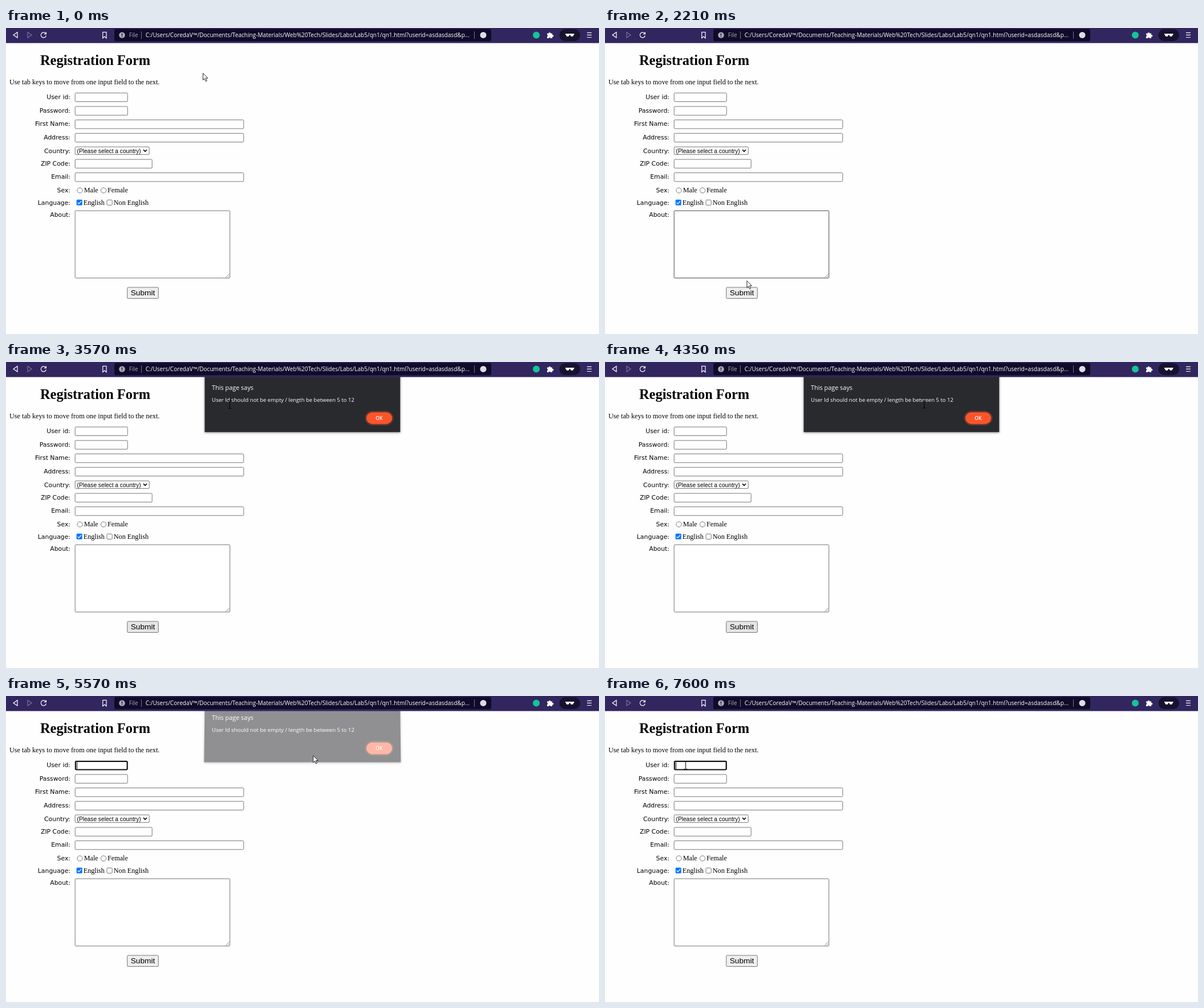
An HTML page that plays this animation: 1040 by 538 pixels, repeating every 8 s.

```html
<!DOCTYPE html>
<html lang="en">
<head>
<meta charset="utf-8">
<title>Registration Form</title>
<style>
  html, body { margin: 0; width: 100%; height: 100%; overflow: hidden; background: #fefefe; }
  svg { display: block; width: 1040px; height: 538px; }
  text { white-space: pre; }
  .serif { font: 12.2px "Liberation Serif", serif; }
  .serif .title { font-size: 24.4px; font-weight: bold; }
  .label { font: 10.85px "DejaVu Sans", sans-serif; text-anchor: end; }
  .sans { font: 10.2px "Liberation Sans", sans-serif; }
  .ui { font: 10.08px "Open Sans", sans-serif; fill: #fff; }
  .box { fill: #fff; stroke: #767676; }
  .line { fill: none; stroke: #fff; stroke-width: 1.2; }
  #dialog { filter: drop-shadow(0 1.5px 2px rgba(0, 0, 0, .45)); }
</style>
</head>
<body>
<svg viewBox="0 0 1040 538">
  <rect width="1040" height="538" fill="#fefefe"/>

  <g class="serif">
    <text class="title" x="60" y="65">Registration Form</text>
    <text x="6" y="98.7">Use tab keys to move from one input field to the next.</text>
    <text x="136.7" y="289">Male</text>
    <text x="178" y="289">Female</text>
    <text x="135.7" y="310.7">English</text>
    <text x="188.8" y="310.7">Non English</text>
  </g>
  <g id="labels" class="label"></g>
  <g id="fields" class="box"></g>

  <g class="box">
    <circle cx="129.5" cy="285.5" r="4.6"/>
    <circle cx="171" cy="285.5" r="4.6"/>
    <rect x="177" y="302.3" width="9.2" height="9.2" rx="1.5"/>
  </g>
  <rect x="123.7" y="301.8" width="10" height="10" rx="1.5" fill="#0075ff"/>
  <path class="line" stroke-width="1.5" d="M125.7 307l2.1 2.1 4-4.6"/>
  <path d="M241 214l3 3 3-3" fill="none" stroke="#000" stroke-width="1.7"/>
  <path d="M385.5 438.5l6-6M389 438.5l2.5-2.5" stroke="#666" stroke-width=".8"/>
  <text class="sans" x="124.5" y="219.6">(Please select a country)</text>
  <rect id="submit" class="box" x="212.7" y="456" width="54.6" height="19.5" rx="1.5"/>
  <text class="sans" x="218.7" y="470.3" style="font-size:13.7px">Submit</text>

  <g id="focus">
    <rect x="122" y="115" width="90.6" height="14.4" rx="1.5" fill="#fff" stroke="#101010" stroke-width="2"/>
    <path id="caret" d="M124.5 116.5V128.5" stroke="#000"/>
  </g>

  <g id="dialog">
    <path id="panel" fill="#292a2d"/>
    <g id="message" class="ui">
      <text x="361" y="48.6" style="font-size:10.9px">This page says</text>
      <text x="361" y="70.2" style="font-size:9.52px">User Id should not be empty / length be between 5 to 12</text>
      <rect x="630.3" y="86.8" width="48.6" height="23.8" rx="11.9" fill="none" stroke="#8c4536"/>
      <rect id="ok" x="631.8" y="88.2" width="45.6" height="21" rx="10.5"/>
      <text x="654.4" y="101.6" text-anchor="middle" style="font-size:8.6px;font-weight:600">OK</text>
    </g>
  </g>

  <g class="ui">
    <rect width="1040" height="26.5" fill="#32265f"/>
    <rect x="190" y="1.8" width="661" height="21.4" rx="3" fill="#0f0b29"/>
    <path class="line" d="M20 7.5V17L13 12.2Z"/>
    <path class="line" d="M38 7.5V17L45 12.2Z" opacity=".35"/>
    <path class="line" stroke-width="1.5" d="M69.4 9.3A4.6 4.6 0 1 0 70.4 13.4"/>
    <path d="M71 6.7V11.3H66.4Z"/>
    <path class="line" d="M169.7 7.3H176V17.8L172.9 15 169.7 17.8Z"/>
    <circle cx="203.5" cy="12.5" r="5.3" fill="#aaa7b8"/>
    <path d="M203.5 9.5V13.4M203.5 14.4V15.8" stroke="#0f0b29" stroke-width="1.4"/>
    <text x="215.7" y="16.2" fill="#aaa7b8">File</text>
    <path d="M237.5 6V19M821.5 6V19" stroke="#77738c"/>
    <text x="244.7" y="16.2">C:/Users/CoredaV™/Documents/Teaching-Materials/Web%20Tech/Slides/Labs/Lab5/qn1/qn1.html?userid=asdasdasd&amp;p...</text>
    <circle cx="837" cy="12.4" r="5.5" fill="#dddce6"/>
    <circle cx="930" cy="12.4" r="6" fill="#15c39a"/>
    <path d="M949 9.5H951.7A1.8 1.8 0 1 1 955.3 9.5H958V12A1.8 1.8 0 1 1 958 15.4V18H955A1.7 1.7 0 0 0 951.8 18H949V15A1.7 1.7 0 0 0 949 11.8Z"/>
    <rect x="970.5" y="2" width="36.5" height="21" rx="10.5" fill="#17122d"/>
    <path d="M981 10H996.5V11.6L995.6 12Q995 15 992.5 15 990 15 989.4 12H988.1Q987.5 15 985 15 982.5 15 981.9 12L981 11.6Z"/>
    <path class="line" d="M1019 8.3H1027M1019 12.4H1027M1019 16.5H1027"/>
  </g>

  <path id="arrow" d="M.5 .5V12.6L3.2 10 5.2 14.7 7.2 13.8 5.2 9.2H9Z" fill="#fff" stroke="#111" stroke-width=".9"/>
  <path id="beam" d="M-3 -6.5H-.7L0 -6 .7 -6.5H3M0 -6V6M-3 6.5H-.7L0 6 .7 6.5H3" fill="none" stroke="#000"/>
</svg>
<script>
const LOOP = 8000;
const $ = id => document.getElementById(id);
const clamp = v => Math.max(0, Math.min(1, v));
const show = (el, on) => el.style.display = on ? '' : 'none';

const labels = [
  ['User id:', 124.8], ['Password:', 148.5], ['First Name:', 172], ['Address:', 195.6], ['Country:', 219.5],
  ['ZIP Code:', 242], ['Email:', 265.4], ['Sex:', 289], ['Language:', 310.7], ['About:', 331.8],
];
$('labels').innerHTML = labels.map(([s, y]) => `<text x="113" y="${y}">${s}</text>`).join('');

// y, width, height
const fields = [
  [114.2, 92, 15.3], [138, 92, 15.3], [161.6, 295.6, 15.3], [185.2, 295.6, 15.3],
  [209, 130, 13.4], [231, 135, 15.3], [254.6, 295.6, 15.3], [321.3, 271.5, 118.3],
];
$('fields').innerHTML = fields.map(([y, w, h]) =>
  `<rect x="121.2" y="${y}" width="${w}" height="${h}" rx="1.3"/>`).join('');
const userField = $('fields').firstElementChild;
const aboutField = $('fields').lastElementChild;

// Pointer path: time, x, y, text beam
const path = [
  [0, 345, 79, 0], [470, 345, 79, 0], [680, 290, 61, 0], [880, 215, 80, 0], [1000, 175, 112, 0],
  [1040, 166, 119, 1], [1100, 160, 121, 1], [1640, 160, 121, 1], [1850, 192, 210, 0],
  [2040, 225, 322, 1], [2205, 248, 442, 0], [2460, 254, 465, 0], [3020, 254, 465, 0],
  [3200, 300, 300, 0], [3420, 372, 110, 0], [3530, 390, 77, 1], [3575, 393, 75, 1],
  [3900, 460, 69, 1], [4200, 530, 72, 1], [4370, 563, 75, 0], [4700, 610, 84, 0],
  [5070, 645, 99, 0], [5170, 647, 98, 0], [5320, 646, 97, 0], [5470, 646, 97, 0],
  [5645, 412, 112, 0], [5740, 250, 118, 0], [5780, 192, 120, 1], [5850, 141.5, 122, 1], [LOOP, 141.5, 122, 1],
];

function slope(i, axis) {
  const a = path[i - 1], b = path[i], c = path[i + 1];
  if (!a || !c || a[axis] === b[axis] || b[axis] === c[axis]) return 0;
  return (c[axis] - a[axis]) / (c[0] - a[0]);
}

function pointerAt(t) {
  const i = path.findIndex((p, k) => k === path.length - 2 || t < path[k + 1][0]);
  const a = path[i], b = path[i + 1], span = b[0] - a[0], u = (t - a[0]) / span;
  const hermite = axis => {
    const v = 1 - u;
    return a[axis] * v * v * (1 + 2 * u) + b[axis] * u * u * (3 - 2 * u)
      + span * u * v * (slope(i, axis) * v - slope(i + 1, axis) * u);
  };
  return { x: hermite(1), y: hermite(2), beam: a[3] };
}

function render(t) {
  const { x, y, beam } = pointerAt(t);
  const pointer = beam ? $('beam') : $('arrow');
  pointer.setAttribute('transform', `translate(${x} ${y})`);
  show($('beam'), beam);
  show($('arrow'), !beam);

  const over = (x0, y0, x1, y1) => x > x0 && x < x1 && y > y0 && y < y1;
  const border = hovered => hovered ? '#484848' : '#767676';
  userField.style.stroke = border(over(121, 113, 213, 130));
  aboutField.style.stroke = border(over(121, 321, 393, 446));
  $('submit').style.fill = t > 2300 && t < 5460 ? '#e5e5e5' : '#efefef';

  show($('focus'), t >= 5500);
  show($('caret'), t < 6030 || (t >= 6570 && t < 7100) || t >= 7600);

  // The dialog swings down while fading in, and back up while fading out
  const p = Math.min(clamp((t - 2900) / 190), clamp(1 - (t - 5480) / 187));
  const lift = 14 * (1 - p), flare = 2.2 * (1 - p);
  show($('dialog'), p > 0);
  $('dialog').style.opacity = p;
  $('panel').setAttribute('d', `M348.5 20H691.3L${691.3 + flare} ${123.3 - lift}H${348.5 - flare}Z`);
  $('message').setAttribute('transform', `translate(0 ${-lift})`);
  $('ok').style.fill = over(630, 87, 679, 111) || t > 5400 ? '#ff7654' : '#fb542b';
}

function tick() {
  render(performance.now() % LOOP);
  requestAnimationFrame(tick);
}
tick();
</script>
</body>
</html>
```
